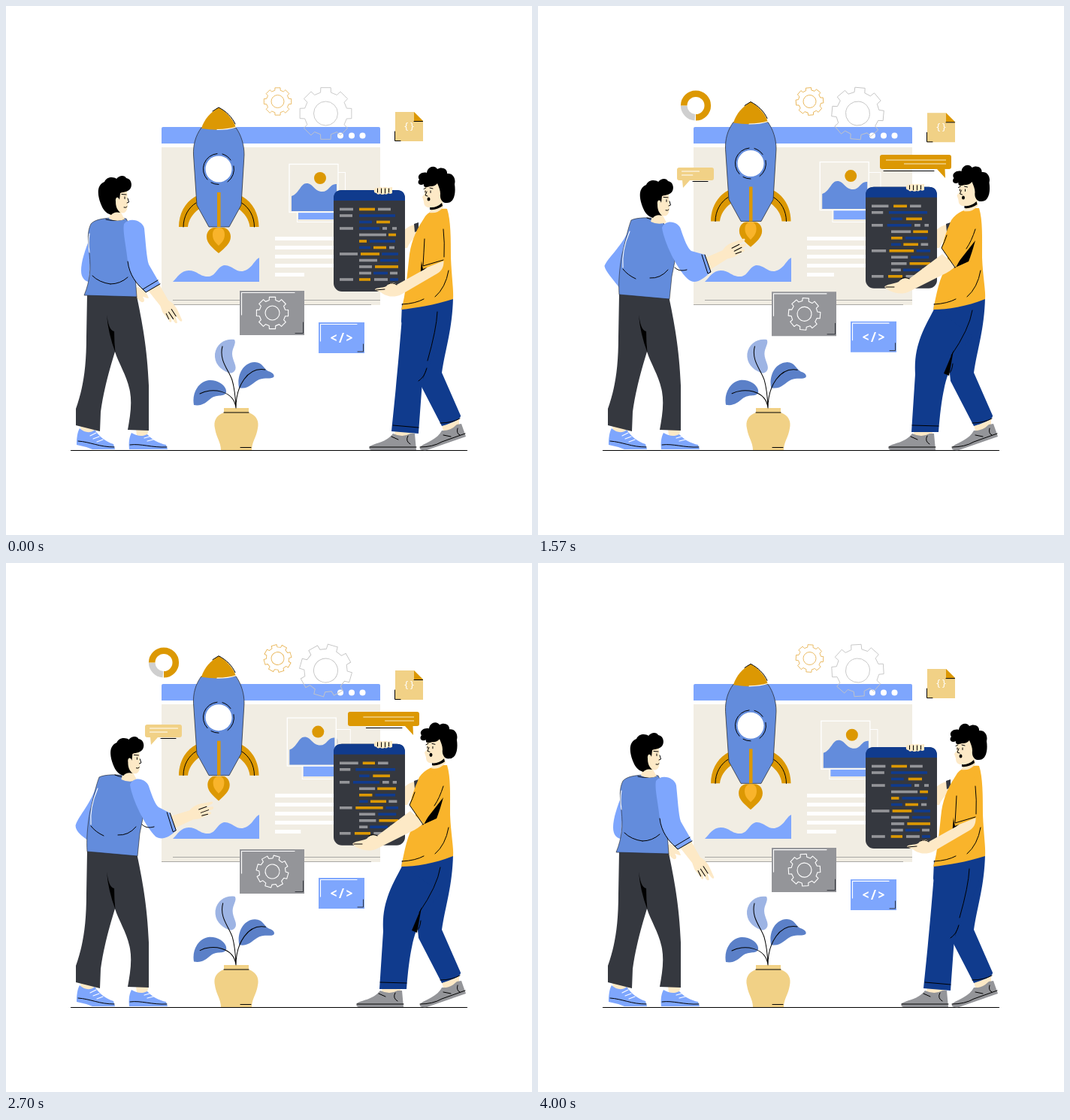
An HTML page that plays this animation: 700x704 px, repeating every 4.04 s.

```html
<!DOCTYPE html>
<html lang="en">
<head>
<meta charset="utf-8">
<title>Building a web page</title>
<style>
html,body{margin:0;width:100%;height:100%;overflow:hidden;background:#fff}
svg{display:block;width:100vw;height:100vh}
.sky{fill:#7ea6fd}.blue{fill:#638cdc}.leaf{fill:#5b80c8}.navy{fill:#103b8d}
.gold{fill:#dc9803}.sun{fill:#f9b42b}.tan{fill:#f1d186}.skin{fill:#fde9c6}
.dark{fill:#35383f}.gray{fill:#949599}.page{fill:#f1ede3}.white{fill:#fff}
.ink,.pale,.dim{fill:none;stroke:#000;stroke-width:1;stroke-linecap:round;stroke-linejoin:round}
.pale{stroke:#fff;stroke-width:1.1}.dim{stroke:#35383f}
text{fill:#fff;font-family:"Noto Sans Mono","DejaVu Sans Mono",monospace;text-anchor:middle}
</style>
</head>
<body>
<svg viewBox="0 0 700 704">
  <!-- browser window -->
  <path class="sky" d="M207 163q0-2 2-2H496q2 0 2 2V183H207Z"/>
  <path class="page" d="M207 188H498V398H207Z"/>
  <path fill="none" stroke="#a9a8a4" d="M222 391.500H498M207 397.500H486"/>
  <g class="white"><circle cx="445" cy="172.500" r="4"/><circle cx="460" cy="172.500" r="4"/><circle cx="474.500" cy="172.500" r="4"/></g>
  <path class="sky" d="M222 367C228 361 233 352 243 352C255 352 258 361 270 360C280 359 281 346 291 345C303 346 305 354 315 353C328 350 330 338 337 335V367Z"/>
  <path class="white" d="M358 307H440V312H358ZM358 319H440V324H358ZM358 331H440V336H358ZM358 343H440V348H358Z"/>
  <rect id="shortLine" class="white" x="358" y="355" height="5"/>

  <!-- picture cards -->
  <g id="backCard">
    <rect x="387.500" y="221.500" width="64" height="66" class="page" stroke="#fff"/>
    <circle cx="427" cy="238" r="8" fill="#cfcfcf"/>
    <path class="sky" d="M389 260H442V284H389Z"/>
  </g>
  <g id="frontCard">
    <rect x="377" y="210.500" width="65" height="64" class="page" stroke="#fff" stroke-width="1.300"/>
    <path class="blue" d="M380 273V253C390 250 392 236 400 236C409 236 410 247 421 247C430 247 431 236 440 237V273Z"/>
    <circle class="gold" cx="418" cy="229" r="8"/>
  </g>

  <!-- rocket -->
  <g id="rocket">
    <g id="flame">
      <path class="gold" d="M283 329C275 322 267 316 267 307C267 300 272 295 277 295H289C294 295 299 300 299 307C299 316 291 322 283 329Z"/>
      <path class="sun" d="M283 319C278 314 275 311 275 304C275 298 279 295 283 295C288 295 291 298 291 304C291 311 288 314 283 319Z"/>
    </g>
    <g id="fin">
      <path class="gold" d="M253 253C239 260 230 276 230 294H242C243 284 249 276 257 270Z"/>
      <path class="ink" d="M253 262C243 268 236 280 236 294"/>
    </g>
    <use href="#fin" transform="matrix(-1 0 0 1 566.500 0)"/>
    <path class="blue" stroke="#222" stroke-width=".7" d="M260 162C252 173 249 185 249.500 198L254 265L270 294H297L313 265L317 198C317 185 313 172 306 162Z"/>
    <path class="gold" d="M283 135C295 142 303 152 306 162Q284 167 260 163C264 150 272 142 283 135Z"/>
    <path class="pale" d="M281 164.500Q296 164.500 306 161"/>
    <path class="ink" d="M275 140L283 135C293 140 301 148 305 157"/>
    <circle class="white" cx="283" cy="217" r="17.500"/>
    <path class="ink" d="M281 196.500A20.500 20.500 0 0 0 268 231M273 235A20.500 20.500 0 0 0 283 237.500M303 213A20.500 20.500 0 0 1 295 234M288 197A20.500 20.500 0 0 1 299 205"/>
    <path class="gold" d="M281 248H285.500V294H281Z"/>
  </g>

  <!-- floating items -->
  <path id="smallGear" fill="none" stroke="#e9b658" stroke-width=".9"/>
  <path id="bigGear" fill="none" stroke="#c4c4c4" stroke-width=".9"/>
  <g id="donut" fill="none" stroke-width="8.600"></g>
  <g id="file">
    <path class="tan" d="M518 141H543L555 153V180H518Z"/>
    <path class="gold" d="M543 141L555 153H543Z"/>
    <path class="ink" d="M543 153.500H554.500M517.500 167V179.500H525"/>
    <text x="536.500" y="164" font-size="13">{}</text>
  </g>
  <g id="gearCard">
    <path class="gray" d="M311 379H397V438H311Z"/>
    <path class="pale" d="M313.500 411V381.500H384"/>
    <path class="dim" d="M385 435.500H395.500V421"/>
    <path id="cardGear" class="pale"/>
  </g>
  <g id="codeCard">
    <path class="sky" d="M416 421H477V462H416Z"/>
    <path class="pale" d="M418.500 446V423.500H467"/>
    <path class="dim" d="M468 460H475.500V450"/>
    <text x="446.500" y="448" font-size="17.500" font-weight="700">&lt;/&gt;</text>
  </g>

  <!-- speech bubbles -->
  <g id="bubbleR">
    <path class="gold" d="M458 198H547Q550 198 550 201V214Q550 217 547 217H541.500L542 229L531 217H458Q455 217 455 214V201Q455 198 458 198Z"/>
    <path id="linesR" fill="none" stroke="#f1d186" stroke-width="1.600"/>
  </g>
  <path id="underR" class="ink"/>
  <g id="bubbleL">
    <path class="tan" d="M188 215H231Q234 215 234 218V229Q234 232 231 232H202L193 242L192 232H188Q185 232 185 229V218Q185 215 188 215Z"/>
    <path id="linesL" class="pale"/>
  </g>
  <path id="underL" class="ink"/>

  <!-- plant -->
  <path class="tan" d="M290 535H323V541C334 545 337 553 335 562C333 575 327 580 327 591H286C286 580 280 575 278 562C276 553 279 545 290 541Z"/>
  <path class="ink" d="M290 541H323M312 587.500H326"/>
  <g id="plant">
    <path fill="#9db4e4" d="M296 488C285 484 277 475 278 463C280 449 292 442 304 444C307 449 301 455 301 463C301 472 309 480 304 486C301 489 298 489 296 488Z"/>
    <path class="leaf" d="M310 508C307 492 315 475 330 474C341 473 343 483 349 486C355 488 358 491 356 494C352 497 345 494 337 497C328 501 323 511 310 508Z"/>
    <path class="leaf" d="M250 531C247 515 256 500 270 498C283 497 294 506 293 514C291 521 281 516 273 522C266 528 260 533 250 531Z"/>
    <path class="ink" d="M288 453C283 472 297 485 301 498Q305 512 306 535M345 484C322 480 306 505 306 535M258 516C272 508 303 510 306 535"/>
  </g>
  <path stroke="#000" d="M86 591.500H614"/>

  <!-- left man -->
  <path id="farHand" class="skin" d="M165 378L176 374C182 376 189 383 190 389C187 389 184 387 182 387C187 393 182 396 179 393L172 387Z"/>
  <path class="skin" d="M98 556H122L119 571L101 568ZM173 563H190L187 574L174 572Z"/>
  <path class="sky" d="M94 584C94 575 95 567 98 562C105 568 112 569 118 564C124 573 133 580 143 583L145 590H115Q105 586 94 584ZM164 590C163 580 164 574 167 568C175 573 182 573 188 570C195 578 204 582 213 584L215 590Z"/>
  <path class="ink" d="M96 579C112 580 124 587 144 587M165 584C180 582 194 588 214 587"/>
  <path class="pale" d="M112 572L120 568M116 576L124 573M121 580L129 577M184 575L191 573M188 579L196 577"/>
  <path class="dark" d="M108 384L174 386C181 420 188 455 190 505L190 565L162 564C165 547 168 530 165 513C161 492 150 476 145 460C139 480 130 510 126 540L125 566L93 558V536C102 510 107 485 107 440Z"/>
  <path d="M134 411C136 423 138 432 144 433Q144 448 145.500 461Q136 436 134 411Z"/>
  <path id="armL" class="sky"/>
  <path id="torsoL" class="blue" stroke="#222" stroke-width=".6"/>
  <path id="shineL" class="pale"/>
  <path id="foldL" class="ink"/>
  <g id="headL">
    <path class="skin" d="M141 268L148 246H161L162 262C162 272 159 277 153 275L158 284Q147 288 137 283Z"/>
    <path d="M126 263C121 250 121 238 131 234C134 227 143 227 147 230C151 225 158 225 160 229C167 230 168 238 166 242C163 248 157 247 152 249L151 258C149 252 145 255 146 260C146 266 147 270 152 275Q144 273 140 278C133 276 129 271 126 263Z"/>
    <path class="ink" d="M154 250.500L160 251M158 254V256.500M162 256L163.500 261L161 262M157 268Q160 269 161 267"/>
  </g>
  <g id="foreL">
    <path class="skin" d="M-6-9L26-7C32-11 40-11 45-10L58-8Q60-6 57-5L47-4L57-1Q58 2 54 2L47 2L52 5Q52 8 48 7L35 8L26 6L-6 9Z"/>
    <path class="ink" d="M38-4L49-4M39 1L50 1M39 5L47 6"/>
  </g>
  <path id="sleeveL" class="sky"/>
  <path id="cuffL" class="ink"/>

  <!-- right man -->
  <path class="skin" d="M578 552L603 548L603 562L583 568Z"/>
  <path class="gray" d="M552 586C560 580 574 577 580 565Q591 566 600 557L606 556L612 573L560 591C551 592 549 589 552 586Z"/>
  <path class="ink" d="M551 587Q568 587 580 580L611 569M582 571L592 573M601 562Q599 569 604 571"/>
  <path class="navy" d="M527 396L595 388C594 430 585 455 580 488L605 545Q606 551 580 559L549 499L546 470L526 420Z"/>
  <path class="ink" d="M578 555Q593 555 604 549"/>
  <g id="shoeR">
    <path class="skin" d="M519 562H542V573H516Z"/>
    <path class="gray" d="M484 586C492 581 506 581 515 569Q528 575 538 569H544L546 591H486Q482 590 484 586Z"/>
    <path class="ink" d="M484 587H546M513 573L522 577M535 572Q531 579 538 583"/>
  </g>
  <path id="legR" class="navy"/>
  <path id="legFoldR" class="ink"/>
  <path id="gapR"/>
  <path class="skin" d="M528 300Q536 292 544 291L546 306Q537 314 534 322L528 322Z"/>
  <path class="dark" d="M543 290L549 288V299L544 301Z"/>

  <g id="tablet">
    <rect class="dark" x="436" y="245" width="95" height="135" rx="11"/>
    <path class="navy" d="M436 259V256Q436 245 447 245H520Q531 245 531 256V259Z"/>
    <g id="code"></g>
    <path class="skin" d="M490 244Q491 241 495 242Q498 240 501 242Q505 240 508 242L514 241V249Q511 251 509 249Q506 252 504 250Q501 252 498 250Q494 252 493 249Q489 249 490 244Z"/>
    <path class="ink" d="M494.500 243V248M499.500 243V249M504.500 243V249M509.500 243V248"/>
  </g>

  <path id="torsoR" class="sun"/>
  <path class="ink" d="M589 352Q585 375 571 387M527 397Q545 396 556 390"/>
  <path id="shadeR"/>
  <path id="foreR" class="skin"/>
  <path id="thumbR" class="ink"/>
  <path id="sleeveR" class="sun"/>
  <path id="hemR" class="ink"/>
  <g id="headR">
    <path class="skin" d="M557 237L579 235L582 268Q574 277 563 275L567 268C559 269 556 266 556 260L554 254L557 250Z"/>
    <path d="M564 268Q573 269 580 262L581 266Q573 272 564 271Z"/>
    <path d="M564 240C559 242 555 241 556 237C551 240 546 236 550 231C546 226 553 220 560 222C561 214 570 211 574 217C580 213 588 217 587 223C595 222 599 230 597 237C599 250 596 262 587 262C581 263 577 257 578 250C578 245 576 241 574 236C571 240 567 240 564 240Z"/>
    <ellipse cx="562.500" cy="257" rx="2" ry="2.600"/>
    <path class="ink" d="M556 243.500L559 242M564 242L568 243M558 246V248M565 246V248.500M560 247L558 252L561 253"/>
  </g>
</svg>
<script>
const LOOP = 4040;
const NUM = /-?\d+(\.\d+)?/g;
const $ = id => document.getElementById(id);
const mix = (a, b, k) => a + (b - a) * k;
const set = (id, name, value) => $(id).setAttribute(name, value);
const place = (id, transform) => set(id, 'transform', transform);
const draw = (id, d) => set(id, 'd', d);

// Linear interpolation through time, value pairs.
function track(t, ...keys) {
  if (t <= keys[0][0]) return keys[0][1];
  for (let i = 1; i < keys.length; i++) {
    const [t0, a] = keys[i - 1], [t1, b] = keys[i];
    if (t <= t1) return mix(a, b, (t - t0) / (t1 - t0));
  }
  return keys[keys.length - 1][1];
}

// Blend neighbouring poses that share one path structure.
function morph(poses, q) {
  const i = Math.min(Math.floor(q), poses.length - 2);
  const k = Math.min(q - i, 1), next = poses[i + 1].match(NUM);
  let n = 0;
  return poses[i].replace(NUM, v => mix(+v, +next[n++], k).toFixed(2));
}

const left = {
  torsoL: [
    'M113 290C120 282 140 281 160 283L168 300L176 330L172 360L174 387L104 385C112 365 113 350 111 330C109 310 108 300 113 290Z',
    'M122 286C130 281 145 281 162 283L172 300L180 335L174 360L172 388L105 384C107 365 107 350 110 330C114 310 117 295 122 286Z',
    'M124 285C132 281 150 281 165 284L172 300L182 340L178 360L175 390L108 384C107 370 108 350 112 330C117 310 120 295 124 285Z'],
  shineL: [
    'M111 303Q109 315 111 328',
    'M120 300Q110 325 112 347',
    'M122 300Q111 325 113 348'],
  foldL: [
    'M115 359Q124 368 139 370M139 370Q152 370 162 361M133 284Q145 287 157 284',
    'M112 350Q117 358 127 361M148 362Q162 363 173 347M141 282Q153 287 163 283',
    'M113 350Q119 358 130 363M149 362Q163 363 173 351M145 282Q156 287 166 283']
};
const armPoses = [
  'M112 308C105 325 100 340 100 352C100 362 105 366 110 367L113 330Z',
  'M120 298C110 325 96 338 93 350C93 358 102 364 110 369L116 330Z',
  'M122 298C108 322 90 335 86 344C88 352 100 364 109 381L118 330Z'];
const sleevePoses = [
  'M157 290C165 280 182 286 184 296C186 315 187 335 190 344L205 370L186 381C176 372 164 358 162 340C160 320 155 300 157 290Z',
  'M163 292C170 284 184 286 187 296C192 312 193 330 196 342L219 344L218 367C200 370 183 362 178 348C172 325 163 305 163 292Z',
  'M165 295C170 283 186 287 190 297C195 312 199 322 203 325L218 333L226 356C215 368 205 368 199 364C185 350 168 315 165 295Z',
  'M165 295C170 283 187 287 190 297C195 312 199 322 204 326L222 331L230 354C215 368 207 370 199 363C185 350 168 315 165 295Z'];
const cuffPoses = [
  'M202 365L182 377L186 381L205 370M162 340C164 358 174 370 182 377',
  'M214 344L213 367L218 367L219 344M178 348C181 357 185 361 191 362',
  'M214 332L222 358L226 356L218 333M181 348C185 352 190 353 197 351',
  'M218 331L226 356L230 354L222 331M182 348C186 352 191 353 198 351'];

const rightLeg = {
  legR: [
    'M528 402C525 440 522 480 513 566L549 569L554 500C565 470 585 440 594 396Z',
    'M528 402C510 435 500 455 502 490L497 567L533 567L538 505C545 470 580 440 594 396Z'],
  legFoldR: [
    'M574 407Q573 430 561 472M549 499Q557 494 560 482M515 558L549 561',
    'M578 405Q574 430 550 465M548 488Q551 485 552 476M498 558L533 559'],
  gapR: [
    'M555 497L560 480L556 492Z',
    'M540 489L553 458L547 492Z']
};
const rightArm = {
  torsoR: [
    'M556 283C562 272 575 269 587 270C592 285 592 310 592 335C593 360 596 380 595 390C570 398 545 402 526 404C532 385 534 355 537 330C540 310 548 295 556 283Z',
    'M550 285C558 273 572 268 587 269C592 285 591 310 591 335C592 360 596 380 595 390C570 400 545 404 526 404C530 385 534 360 545 345C545 310 545 295 550 285Z'],
  shadeR: [
    'M554 325Q558 340 560 350L551 363Z',
    'M582 312Q577 330 573 340L553 349Z'],
  foreR: [
    'M556 351L582 333C584 345 581 352 574 356L526 384C515 389 505 386 499 381L491 378C491 374 500 376 506 373C510 368 516 366 520 371Z',
    'M538 330L556 346C552 350 545 355 538 358L494 380C484 385 474 382 466 378L461 374C463 370 474 370 480 367C484 362 490 361 494 363Z'],
  thumbR: [
    'M492 378L504 377M509 370Q514 367 520 371',
    'M463 374L474 374M483 363Q488 360 494 363'],
  sleeveR: [
    'M556 285C566 273 582 277 585 298L583 339L555 350C550 330 550 300 556 285Z',
    'M550 287C560 274 580 280 582 300L556 348L537 322C542 305 545 295 550 287Z'],
  hemR: [
    'M582 297Q584 315 583 334M557 310Q556 330 555 346L582 338',
    'M582 297Q577 313 570 323M544 305Q541 314 537 322L555 348']
};

// Colour, then start and end at rest, then start and end when raised.
const codeRows = [
  'g444 462 444 472,o470 491 477 491,g495 512 495 507',
  'g444 461 444 457,n470 518 463 518',
  'n470 487 470 482,o493 511 486 511',
  'g444 462 444 455,n470 497 458 497,g501 507 501 511,g514 520 515 520',
  'g470 506 470 484,o509 519 487 519',
  'o470 480 470 491,n484 518 495 518',
  'n470 485 470 480,o489 506 483 506,g510 517 509 522',
  'g444 468 444 457,o472 497 462 504,n500 522 508 522',
  'g470 494 470 490,n498 522 494 518',
  'g470 487 470 495,o491 522 499 522',
  'g470 486 470 479,n489 508 482 508,g511 521 511 521',
  'g444 462 444 457,o470 485 461 485,g490 508 489 505,n511 522 509 522'
];
const codeClass = { g: 'gray', o: 'gold', n: 'navy' };

const NS = 'http://www.w3.org/2000/svg';
function add(parent, tag, attrs) {
  const node = document.createElementNS(NS, tag);
  for (const name in attrs) node.setAttribute(name, attrs[name]);
  return $(parent).appendChild(node);
}

const segments = codeRows.flatMap((row, i) => row.split(',').map(part => ({
  ends: part.slice(1).split(' ').map(Number),
  node: add('code', 'rect', { class: codeClass[part[0]], y: 268.7 + i * 8.5, height: 3.6 })
})));

const slices = [[0, 180, '#dc9803'], [184, 269, '#cfcfcf'], [270, 360, '#dc9803']]
  .map(([from, to, stroke]) => ({ from, to, node: add('donut', 'path', { stroke }) }));

function polar(r, deg) {
  const a = deg * Math.PI / 180;
  return `${(r * Math.sin(a)).toFixed(2)} ${(-r * Math.cos(a)).toFixed(2)}`;
}

function gear(id, r, hub) {
  const points = [];
  for (let a = 0; a < 360; a += 45)
    points.push(polar(r * .82, a - 14), polar(r, a - 11), polar(r, a + 11), polar(r * .82, a + 14));
  draw(id, `M${points.join('L')}ZM${hub} 0A${hub} ${hub} 0 1 0 ${-hub} 0A${hub} ${hub} 0 1 0 ${hub} 0`);
}
gear('smallGear', 18.5, 8.5);
gear('bigGear', 35, 16);
gear('cardGear', 21.5, 9.5);

function arc(from, to) {
  if (to <= from) return '';
  return `M${polar(15.8, from)}A15.8 15.8 0 ${to - from > 180 ? 1 : 0} 1 ${polar(15.8, to)}`;
}

function grow(id, x, y, s) {
  place(id, `translate(${x} ${y}) scale(${s}) translate(${-x} ${-y})`);
}

function drawFloating(t) {
  const bob = 1 - Math.abs(1 - (t % (LOOP / 2)) / (LOOP / 4));
  const turn = 360 * t / LOOP;
  place('rocket', `translate(0 ${-16.8 * bob})`);
  place('flame', `translate(283 295) scale(${1 - .12 * bob} ${1 - .05 * bob}) translate(-283 -295)`);
  place('backCard', `translate(${10 * bob} 0)`);
  place('frontCard', `translate(${-4 * bob} ${-6.5 * bob})`);
  place('file', `translate(0 ${3 * bob})`);
  place('gearCard', `translate(0 ${3 * bob})`);
  place('codeCard', `translate(0 ${-3 * bob})`);
  place('plant', `rotate(${.7 * bob} 306 535)`);
  place('smallGear', `translate(361.5 127) rotate(${-turn})`);
  place('bigGear', `translate(425.5 143) rotate(${turn})`);
  place('cardGear', `translate(354.5 408.5) rotate(${turn})`);
  set('shortLine', 'width', 39 - 7 * bob);
  for (const { ends: [a, b, c, d], node } of segments) {
    const x = mix(a, c, bob);
    node.setAttribute('x', x);
    node.setAttribute('width', Math.max(0, mix(b, d, bob) - x));
  }
}

function drawSigns(t) {
  const start = track(t, [2830, 0], [3540, 360]);
  const end = track(t, [80, 0], [480, 183], [900, 360]);
  place('donut', 'translate(210 132.5)');
  for (const { from, to, node } of slices)
    node.setAttribute('d', arc(Math.max(from, start), Math.min(to, end)));

  grow('bubbleR', 550, 229, track(t, [200, 0], [480, .86], [560, 1.05], [650, 1], [2780, 1], [2860, 1.05], [3040, .46], [3160, 0]));
  const r = track(t, [450, 0], [480, .12], [1040, .84], [1250, 1], [2650, 1], [2980, 0]);
  const r2 = track(t, [520, 0], [1040, .68], [1300, 1], [2600, 1], [2930, 0]);
  draw('linesR', (r ? `M543 205H${543 - 80 * r}` : '') + (r2 ? `M543 210H${543 - 56 * r2}` : ''));
  const u = track(t, [420, 0], [480, .38], [700, 1]), v = track(t, [2600, 0], [2950, 1]);
  draw('underR', u > v ? `M${460 + 67 * v} 219.5H${460 + 67 * u}` : '');

  grow('bubbleL', 185, 242, track(t, [880, 0], [1040, .64], [1150, 1.06], [1250, 1], [2940, 1], [3040, 1.06], [3240, 0]));
  const l = track(t, [1200, 0], [1570, .62], [1800, 1], [2950, 1], [3200, 0]);
  draw('linesL', l ? `M191.5 220H${191.5 + 37 * l}M191.5 225H${191.5 + 23 * l}` : '');
  const w = track(t, [1150, 0], [1450, 1], [3040, 1], [3220, 0]);
  draw('underL', w ? `M206 233.5H${206 + 20 * w}` : '');
}

function drawLeftMan(t) {
  const q = track(t, [0, 0], [480, 1], [1040, 2], [1570, 3], [2300, 2.7], [2750, 2], [3040, 1.05], [3880, 0]);
  const lean = Math.min(q, 2);
  const elbow = track(t, [0, 0], [480, 1], [1040, 2], [1570, 1.65], [2300, 1.15], [3040, 1], [3880, 0]);
  for (const id in left) draw(id, morph(left[id], lean));
  draw('armL', morph(armPoses, elbow));
  draw('sleeveL', morph(sleevePoses, q));
  draw('cuffL', morph(cuffPoses, q));
  const [x, y] = morph(['196 374', '218 355', '222 345', '226 343'], q).split(' ');
  const angle = track(t, [0, 57], [480, -1], [1040, -36], [1570, -27], [2300, -32], [3040, -10], [3880, 57]);
  place('foreL', `translate(${x} ${y}) rotate(${angle})`);
  place('farHand', `translate(${-36 * Math.min(q * 1.5, 1)} 0)`);
  const dx = track(t, [0, 0], [480, 9], [1040, 13], [1570, 13], [2300, 18], [2600, 18], [3040, 11], [3880, 0]);
  place('headL', `translate(${dx} ${dx * .3})`);
}

function drawRightMan(t) {
  const arm = track(t, [0, 0], [480, .86], [900, 1], [2700, 1], [3040, .75], [3750, 0]);
  const step = track(t, [0, 0], [480, .71], [850, 1], [2860, 1], [3040, .95], [3250, .62], [3800, 0]);
  const nod = track(t, [0, 0], [480, .65], [900, 1], [2600, 1], [3040, .3], [3380, 0]);
  for (const id in rightLeg) draw(id, morph(rightLeg[id], step));
  for (const id in rightArm) draw(id, morph(rightArm[id], arm));
  place('shoeR', `translate(${-17 * step} 0)`);
  place('tablet', `translate(0 ${-4.2 * arm})`);
  place('headR', `translate(${3.5 * nod} ${-2 * nod})`);
}

function render(now) {
  const t = now % LOOP;
  drawFloating(t);
  drawSigns(t);
  drawLeftMan(t);
  drawRightMan(t);
}

const begin = performance.now();
function loop() {
  render(performance.now() - begin);
  requestAnimationFrame(loop);
}
loop();
</script>
</body>
</html>
```
